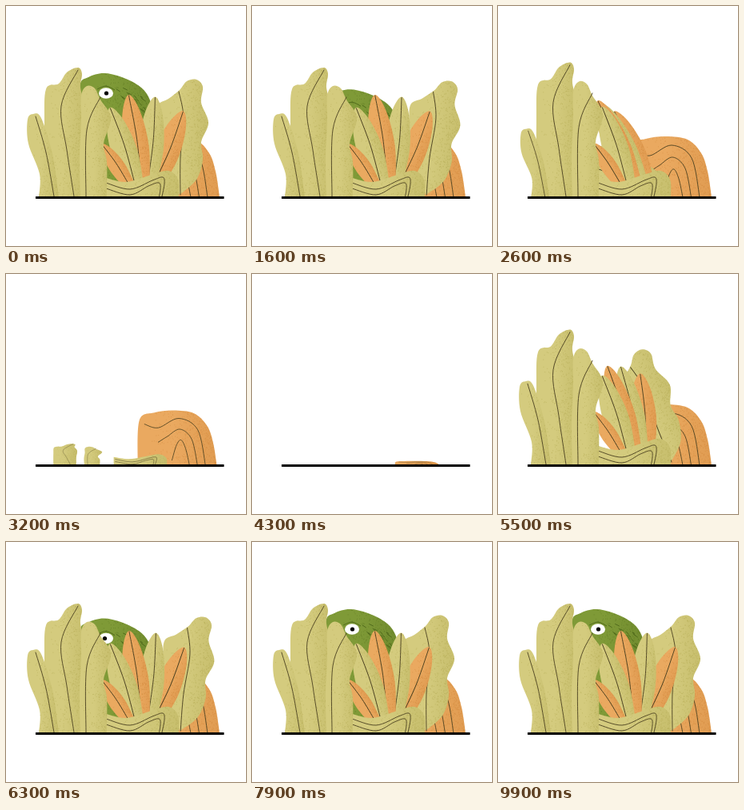
Animation, 300 px wide and 300 px high, one loop 10000 ms. Source, as an HTML page:

```html
<!DOCTYPE html>
<html lang="en">
<head>
<meta charset="utf-8">
<title>Peeking through the bushes</title>
<style>
html, body { margin: 0; width: 100%; height: 100%; overflow: hidden; background: #fff; }
svg { display: block; width: 100vw; height: 100vh; }
</style>
</head>
<body>
<svg viewBox="0 0 300 300">
  <defs><clipPath id="ground"><rect width="300" height="239"/></clipPath></defs>
  <g id="scene" clip-path="url(#ground)"></g>
  <path d="M37 239.5H272.5" stroke="#000" stroke-width="2.8"/>
</svg>
<script>
const NS = 'http://www.w3.org/2000/svg';
const LOOP = 10000, STEP = 100, MIDDLE = 4000, FLOOR = 239;
const OLIVE = { fill: '#d4cb7e', dark: '#a9a045' };
const ORANGE = { fill: '#eaa960', dark: '#c97d30' };
const GREEN = { fill: '#7f9a37', dark: '#526c1c' };
const scene = document.getElementById('scene');
let seed = 7, clipCount = 0;

function rnd() {
  seed = (seed * 16807) % 2147483647;
  return seed / 2147483647;
}

function add(parent, tag, attrs = {}) {
  const el = document.createElementNS(NS, tag);
  for (const key in attrs) el.setAttribute(key, attrs[key]);
  return parent.appendChild(el);
}

const group = (parent = scene) => add(parent, 'g');

// Smooth curve through x, y pairs
function curve(...n) {
  const last = n.length / 2 - 1;
  const at = i => {
    const k = 2 * Math.max(0, Math.min(last, i));
    return [n[k], n[k + 1]];
  };
  let d = 'M' + at(0);
  for (let i = 0; i < last; i++) {
    const [a, b, c, e] = [at(i - 1), at(i), at(i + 1), at(i + 2)];
    const out = b.map((v, j) => v + (c[j] - a[j]) / 6);
    const back = c.map((v, j) => v - (e[j] - b[j]) / 6);
    d += `C${out} ${back} ${c}`;
  }
  return d;
}

// Shade that darkens to the right
for (const tone of [OLIVE, ORANGE, GREEN]) {
  const id = 'shade' + tone.dark.slice(1);
  const ramp = add(scene, 'linearGradient', { id });
  add(ramp, 'stop', { offset: 0.45, 'stop-color': tone.dark, 'stop-opacity': 0 });
  add(ramp, 'stop', { offset: 1, 'stop-color': tone.dark, 'stop-opacity': 0.3 });
  tone.shade = `url(#${id})`;
}

function blob(parent, d, tone, veins) {
  const id = 'clip' + clipCount++;
  add(add(parent, 'clipPath', { id }), 'path', { d });
  const body = add(parent, 'path', { d, fill: tone.fill });
  const { x, y, width, height } = body.getBBox();
  add(parent, 'path', { d, fill: tone.shade });
  let dots = '';
  for (let i = 0; i < width * height / 14; i++) {
    dots += `M${x + width * Math.pow(rnd(), 0.4)} ${y + height * rnd()}h.8`;
  }
  const grain = add(parent, 'g', { 'clip-path': `url(#${id})` });
  add(grain, 'path', { d: dots, stroke: tone.dark, 'stroke-width': 0.8, opacity: 0.55 });
  add(parent, 'path', { d: veins, fill: 'none', stroke: '#4a4020', 'stroke-width': 0.9, 'stroke-linecap': 'round' });
}

// Creature
const head = group();
blob(head, curve(92, 150, 92, 100, 103, 89, 122, 84, 145, 89, 169, 102, 181, 121, 182, 150) + 'V240H92Z', GREEN, '');
let fur = curve(114, 104, 125, 100, 136, 105);
for (let i = 0; i < 20; i++) {
  const x = 137 + 38 * rnd(), y = 95 + (x - 137) * 0.5 + 20 * rnd();
  fur += `M${x} ${y}l${3 + 3 * rnd()} ${2 + 3 * rnd()}`;
}
add(head, 'path', { d: fur, fill: 'none', stroke: GREEN.dark });
const eye = group(head);
add(eye, 'ellipse', { rx: 9, ry: 6.8, fill: '#fff' });
const pupil = add(eye, 'circle', { r: 2.6 });

// Orange mound with nested arches
const mound = group();
let arches = '';
for (let i = 0; i < 3; i++) {
  arches += curve(172 + 18 * i, 182 + 25 * i, 190 + 12 * i, 187 + 12 * i, 217 + 1.5 * i, 174 + 15 * i,
    242 - 8 * i, 190 + 13 * i, 252 - 10.5 * i, FLOOR);
}
blob(mound, curve(163, 239, 165, 177, 185, 166, 210, 163, 237, 167, 254, 184, 262, 207, 267, 239) + 'Z', ORANGE, arches);

// Right bush
const bush = group();
blob(bush, curve(217, 236, 200, 195, 190, 150, 189, 125, 203, 116, 217, 105, 226, 94, 238, 92, 246, 101,
  244, 121, 253, 146, 244, 170, 246, 192, 238, 217, 217, 236) + 'Z',
  OLIVE, curve(216, 107, 222, 140, 218, 190, 218, 236));

// Fan, drawn from right to left: angle and length per leaf
const fan = group();
const leaves = [[-34, 60], [-18, 100], [-8, 112], [5, 109], [22, 98]].map(([angle, len], i) => {
  const el = add(fan, 'g');
  fan.prepend(el);
  const w = i ? 16 : 10;
  blob(el, curve(-w * 0.6, 8, -w, -len * 0.4, -w * 0.7, -len * 0.8, 0, -len, w * 0.7, -len * 0.8, w, -len * 0.4, w * 0.6, 8) + 'Z',
    i % 2 ? OLIVE : ORANGE, curve(0, 1 - len, w * 0.15, -len / 2, 0, 0));
  return { el, angle, x: 153 + 8 * i, fold: -9 * Math.max(0, i - 1) };
});

// Low front bush
const low = group();
let waves = '';
for (let i = 0; i < 2; i++) {
  const x = -5 * i, y = 7 * i;
  waves += curve(125, 221 + y, 155, 229 + y, 183 + x, 218 + y, 196 + x, 214 + y, 198 + x, 222 + y, 195 + x, 238 + y);
}
blob(low, curve(122, 214, 150, 220, 182, 211, 203, 206, 215, 217, 216, 239) + 'H122Z', OLIVE, waves);

// Left bush: the outer leaf leaves first and returns last
const tall = [
  [0, 75, curve(48, 239, 48, 150, 50, 104, 66, 97, 76, 83, 90, 77, 95, 85, 93, 102, 99, 130, 97, 180, 97, 239),
    curve(90, 80, 69, 125, 76, 180, 85, 238)],
  [300, 45, curve(41, 239, 42, 210, 28, 172, 27, 142, 34, 135, 44, 140, 58, 185, 66, 239),
    curve(37, 138, 50, 183, 60, 238)],
  [0, 105, curve(93, 239, 92, 190, 94, 145, 94, 112, 101, 100, 111, 103, 118, 117, 131, 140, 122, 172, 126, 195, 126, 239),
    curve(118, 114, 101, 155, 100, 238)]
].map(([lead, x, d, vein]) => {
  const el = group();
  blob(el, d + 'Z', OLIVE, vein);
  return { el, lead, x };
});

// 1 while present, 0 while away; spring sets the overshoot near the present end
function present(t, leave, enter, span, spring) {
  const u = t < MIDDLE ? 1 - (t - leave) / span : (t - enter) / span;
  const v = Math.max(0, Math.min(1, u)) - 1;
  return 1 + (spring + 1) * v ** 3 + spring * v * v;
}

const move = (el, text) => el.setAttribute('transform', text);
const show = (el, on) => el.setAttribute('visibility', on ? 'visible' : 'hidden');

function grow(el, s, x) {
  show(el, s > 0.001);
  move(el, `translate(${x} ${FLOOR}) scale(${0.5 + 0.5 * Math.min(1, s)} ${s}) translate(${-x} ${-FLOOR})`);
}

function draw(t) {
  const up = present(t, 1190, 5840, 800, 0);
  show(head, up > 0);
  move(head, `translate(0 ${150 * (1 - up)})`);
  move(eye, `translate(125 109) scale(1 ${present(t, 1200, 6000, 200, 0)})`);
  pupil.setAttribute('cx', 2 * present(t, 1200, 6500, 400, 0) - 1.5);

  grow(mound, present(t, 2750, 4280, 900, 0.2), 197);

  const turn = present(t, 1370, 5110, 1420, 1.6);
  show(bush, turn > 0);
  move(bush, `rotate(${150 * (turn - 1)} 215 238)`);

  grow(fan, present(t, 2450, 4700, 750, 0.5), 168);
  const fold = 2 * (1 - present(t, 1450, 5300, 1200, 0.8));
  for (const { el, x, angle, fold: bend } of leaves) {
    move(el, `translate(${x} 222) rotate(${angle + bend * fold})`);
  }

  grow(low, present(t, 2600, 4500, 700, 0.4), 165);
  for (const { el, lead, x } of tall) grow(el, present(t, 2050 - lead, 4640 + lead, 1200, 1.2), x);
}

const start = performance.now();
function tick() {
  const t = Math.max(0, performance.now() - start) % LOOP;
  draw(Math.floor(t / STEP) * STEP);
  requestAnimationFrame(tick);
}
draw(0);
requestAnimationFrame(tick);
</script>
</body>
</html>
```
